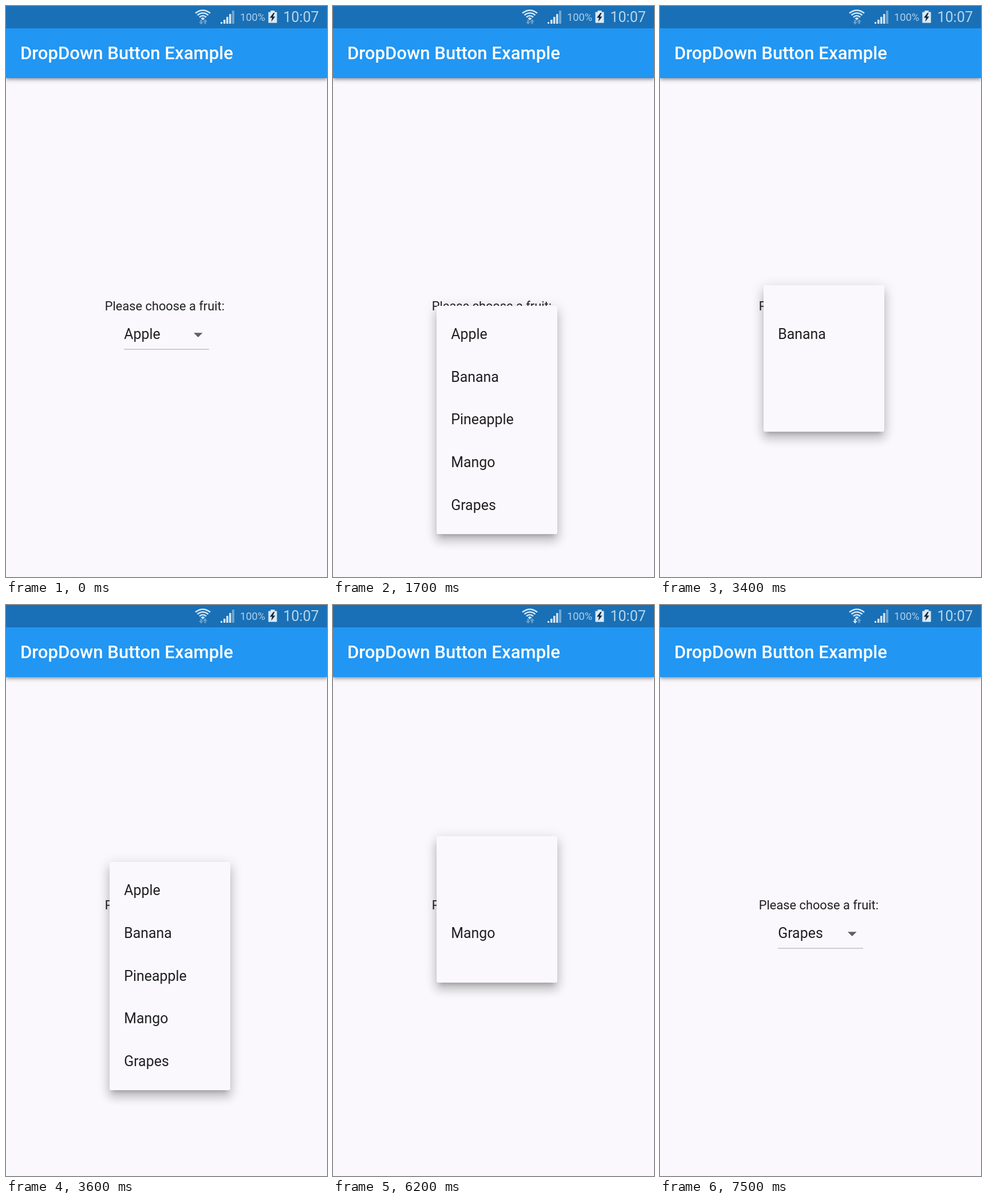
An HTML page for the animation above (8000 ms loop, 561 by 998 pixels).

```html
<!DOCTYPE html>
<html lang="en">
<head>
<meta charset="utf-8">
<title>Dropdown demo</title>
<style>
html, body { margin: 0; width: 100%; height: 100%; overflow: hidden; background: #faf8fc; }
body { position: relative; font: 24.93px Roboto, sans-serif; color: #202022; }
body * { position: absolute; white-space: pre; }
#status { left: 0; top: 0; }
#bar { left: 0; top: 39px; width: 561px; height: 87px; background: #2196f3;
  box-shadow: 0 2px 6px rgba(0,0,0,.38), 0 3px 9px rgba(0,0,0,.1); }
#bar span { left: 24.9px; font: 500 31.17px/87px Roboto, sans-serif; color: #fff; }
#label { left: 172.8px; top: 510px; font-size: 21.8px; line-height: 30px; }
#value, .item { left: 206.2px; height: 74.8px; line-height: 74.8px; }
#value { top: 537.2px; }
#line { left: 206px; top: 599px; width: 149px; height: 1.5px; background: #cfced2; }
#arrow { left: 328px; top: 571.3px; width: 15.6px; height: 7.8px; background: #616163;
  clip-path: polygon(0 0, 100% 0, 50% 100%); }
#menu { left: 0; top: 0; width: 561px; height: 998px; }
#panel { left: 181.3px; width: 210.5px; border-radius: 3px; background: #faf8fc;
  box-shadow: 0 7.8px 7.8px -4.7px rgba(0,0,0,.2), 0 12.5px 15.6px 1.6px rgba(0,0,0,.14),
    0 4.7px 21.8px 3.1px rgba(0,0,0,.12); }
#press { left: 181.3px; width: 210.5px; height: 74.8px; background: rgba(188,188,188,.18); }
</style>
</head>
<body>
<div id="bar"><span>DropDown Button Example</span></div>
<svg id="status" width="561" height="39" font-family="Roboto, sans-serif">
  <rect width="561" height="39" fill="#1970b6"/>
  <g fill="none" stroke="#d3e5f3" stroke-width="2.6">
    <path d="M331 12.5Q344 2.5 357 12.5M334.5 16Q344 8.5 353.5 16M338 19.5Q344 14.5 350 19.5"/>
  </g>
  <path d="M340.5 21.5Q344 18.5 347.5 21.5L344 25Z" fill="#d3e5f3"/>
  <path id="down" d="M339.5 24h3v4h2.5l-4 4.5-4-4.5h2.5z"/>
  <path d="M346.5 31.5h3v-4h2.5l-4-4.5-4 4.5h2.5z" fill="#67a0d0"/>
  <path d="M375 28h3v3h-3zM380 24h3.5v7h-3.5zM385 19h3.5v12h-3.5zM390 14h3.5v17h-3.5z" fill="#d3e5f3"/>
  <path d="M395 8h4v23h-4z" fill="#6fa6d2"/>
  <text x="409" y="26" font-size="18.3" fill="#b0cfe8">100%</text>
  <path d="M462.5 8h7v2.5h4v19h-15v-19h4z" fill="#dbe9f4"/>
  <path d="M467.5 12l-6.5 8.5h4l-1.500 7 7-9h-4l3-6.500z" fill="#10273b"/>
  <text x="484.5" y="28" font-size="25" fill="#b9d5eb">10:07</text>
</svg>
<div id="label">Please choose a fruit:</div>
<div id="value"></div>
<div id="line"></div>
<div id="arrow"></div>
<div id="menu"><div id="panel"></div><div id="press"></div></div>
<script>
const $ = id => document.getElementById(id);
const fruits = ["Apple", "Banana", "Pineapple", "Mango", "Grapes"];
const LOOP = 8000, STEP = 100, ROW = 74.8, PAD = 12.5, DURATION = 300;
// lead: how far the opening has already run when the menu first shows
const sessions = [
  { open: 400, lead: 300, press: 1800, from: 0, to: 1 },
  { open: 3400, lead: 117, press: 4600, from: 1, to: 3 },
  { open: 6200, lead: 117, press: 7300, from: 3, to: 4 }
];
const items = fruits.map(name => {
  const item = document.createElement("div");
  item.className = "item";
  item.textContent = name;
  $("menu").append(item);
  return item;
});
const interval = (t, start, end) => Math.min(1, Math.max(0, (t - start) / (end - start)));
const mix = (a, b, k) => a + (b - a) * k;

function drawMenu({ open, lead, press, from, to }, time) {
  const t = Math.min(1, (time - open + lead) / DURATION);
  const top = 524.2 - ROW * from;
  const first = top + PAD + ROW * from;
  const grow = interval(t, .25, .5);
  const panelTop = mix(first, top, grow);
  const panelBottom = mix(first + ROW, top + ROW * fruits.length + 2 * PAD, grow);
  const unit = .5 / (fruits.length + 1.5);

  $("menu").style.opacity = time > press ? .4 : interval(t, 0, .25);
  $("panel").style.top = panelTop + "px";
  $("panel").style.height = panelBottom - panelTop + "px";
  $("press").style.top = top + PAD + ROW * to + "px";
  $("press").style.opacity = time >= press ? 1 : 0;
  items.forEach((item, i) => {
    const start = .5 + (i + 1) * unit;
    item.style.top = top + PAD + ROW * i + "px";
    item.style.opacity = i === from ? 1 : interval(t, start, start + 1.5 * unit);
  });
}

function draw(now) {
  const time = Math.floor(now % LOOP / STEP) * STEP;
  const active = sessions.find(s => time >= s.open && time < s.press + 2 * STEP);
  const chosen = sessions.filter(s => time > s.press).pop();
  $("value").textContent = fruits[chosen ? chosen.to : 0];
  $("down").setAttribute("fill", time >= 7000 ? "#d3e5f3" : "#67a0d0");
  $("menu").style.visibility = active ? "visible" : "hidden";
  if (active) drawMenu(active, time);
  requestAnimationFrame(draw);
}
draw(performance.now());
</script>
</body>
</html>
```
